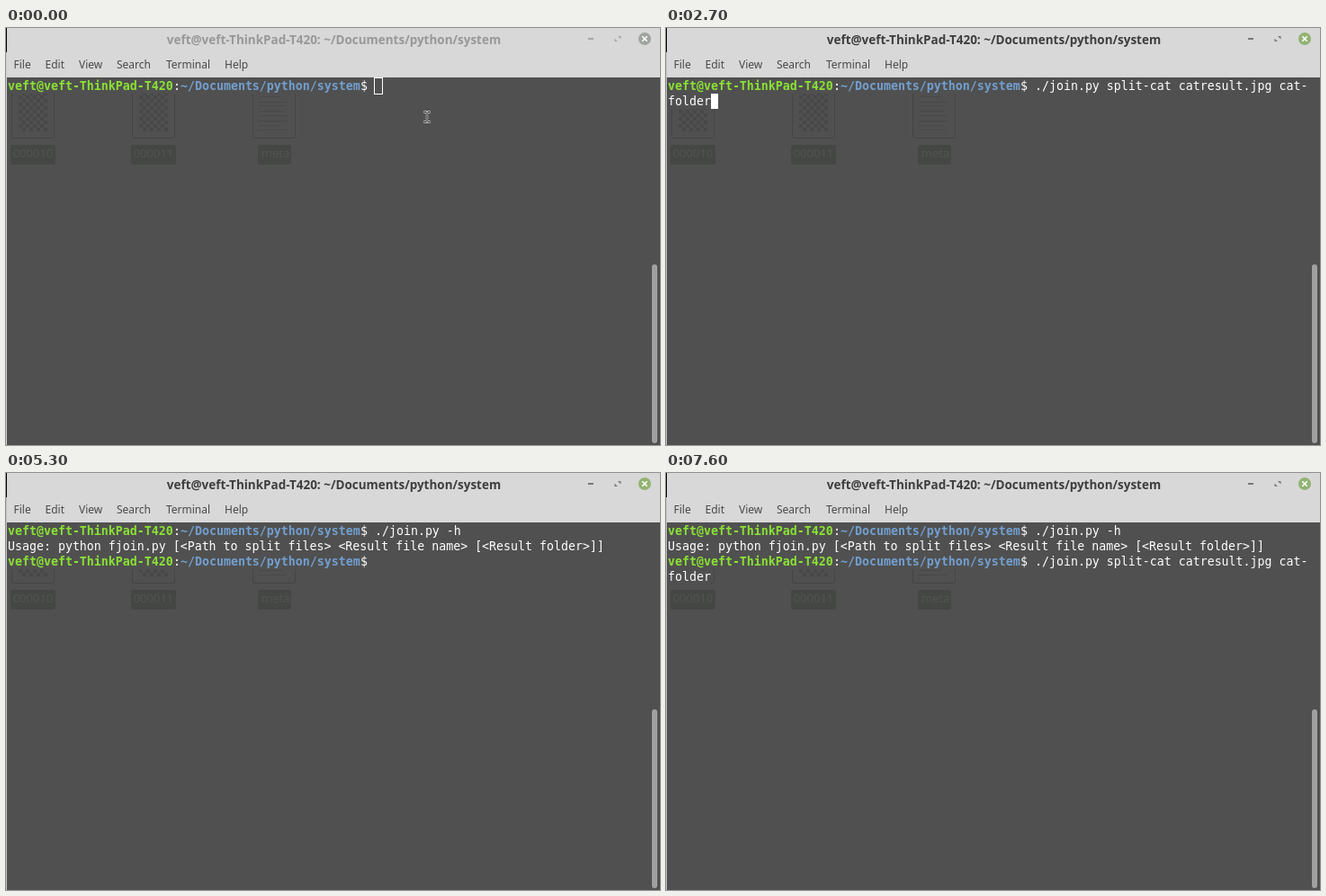
These frames come from a looping animation (727 by 464 pixels, 8000 ms). An HTML page:

```html
<!DOCTYPE html>
<html lang="en">
<head>
<meta charset="utf-8">
<title>Terminal session</title>
<style>
  html, body { margin: 0; width: 100%; height: 100%; overflow: hidden; background: #505050; }
  svg { display: block; }
  text { white-space: pre; }
  .mono { font-family: "DejaVu Sans Mono", monospace; font-size: 13.288px; }
  .sans { font-family: "Noto Sans", sans-serif; font-size: 12px; }
  .title { font-size: 13.47px; font-weight: bold; }
  .label { font-size: 13px; fill: #525452; }
</style>
</head>
<body>
<svg id="stage" width="727" height="464" viewBox="0 0 727 464">
  <defs>
    <pattern id="checker" x="14" y="75" width="8" height="8" patternUnits="userSpaceOnUse">
      <path d="M0 0h4v4h-4zM4 4h4v4h-4z" fill="#484848"/>
    </pattern>
    <g id="image-icon">
      <path d="M6.500 55V120.500q0 2 2 2H51.500q2 0 2-2V55" fill="none" stroke="#444"/>
      <path d="M14 55h32v60h-32z" fill="url(#checker)"/>
    </g>
  </defs>
  <rect width="727" height="464" fill="#505050"/>

  <!-- desktop showing through the terminal -->
  <use href="#image-icon"/>
  <use href="#image-icon" x="134"/>
  <path d="M274.500 55V120.500q0 2 2 2H319.500q2 0 2-2V55" fill="none" stroke="#444"/>
  <path d="M281 76.500h25M281 82.500h32M281 86.500h30M281 92.500h28M281 97.500h32M281 103.500h33M281 108.500h26M281 113.500h31" stroke="#484848"/>
  <g fill="#454745">
    <rect x="5" y="130" width="50" height="22" rx="2"/>
    <rect x="139" y="130" width="50" height="22" rx="2"/>
    <rect x="280" y="130" width="37" height="22" rx="2"/>
  </g>
  <g class="sans label" text-anchor="middle">
    <text x="30" y="144">000010</text>
    <text x="164" y="144">000011</text>
    <text x="299.500" y="144">meta</text>
  </g>

  <g id="screen"></g>

  <!-- window frame -->
  <rect width="727" height="55" fill="#d8d8d8"/>
  <rect id="edge" y="27" width="1" height="437"/>
  <rect width="1" height="27" fill="#000"/>
  <rect x="718" y="263" width="6" height="199" rx="3" fill="#a0a0a0"/>
  <text id="title" class="sans title" x="364.500" y="18" text-anchor="middle"></text>
  <g id="buttons">
    <path d="M647 11h6v2h-6z"/>
    <path d="M680 9h3.500v3.500zM676.500 11.500v3.500h3.500z"/>
  </g>
  <circle id="close" cx="710" cy="12" r="7"/>
  <path d="M707.300 9.300l5.400 5.400M712.700 9.300l-5.400 5.400" stroke="#fff" stroke-width="1.600"/>
  <g class="sans" fill="#484848">
    <text x="8.500" y="45">File</text>
    <text x="43.500" y="45">Edit</text>
    <text x="81" y="45">View</text>
    <text x="123" y="45">Search</text>
    <text x="178" y="45">Terminal</text>
    <text x="243" y="45">Help</text>
  </g>
  <g id="pointer" fill="none">
    <path d="M464.500 93.500h2.500l1 1 1-1h2.500M468 94.500v9M464.500 104.500h2.500l1-1 1 1h2.500" stroke="#e8e8e8" stroke-width="2.400"/>
    <path d="M465 93.500h2l1 1 1-1h2M468 94.500v9M465 104.500h2l1-1 1 1h2" stroke="#000"/>
  </g>
</svg>
<script>
const LOOP = 8000, COLS = 89, CELL = 8, ROW = 17, LEFT = 2, TOP = 56;
const HOST = "veft@veft-ThinkPad-T420", DIR = "~/Documents/python/system";
const PROMPT = `${HOST}:${DIR}$ `;
const HELP = PROMPT + "./join.py -h";
const CLEAR = PROMPT + "clear";
const JOIN = PROMPT + "./join.py split-cat catresult.jpg cat-folder";
const USAGE = "Usage: python fjoin.py [<Path to split files> <Result file name> [<Result folder>]]";
const done = [HELP, USAGE];

// [start time, terminal lines, cursor]
const steps = [
  [0, [PROMPT], "hollow"],
  [200, [PROMPT], "solid"],
  [900, [PROMPT]],
  [1500, [PROMPT], "solid"],
  [2100, [PROMPT]],
  [2500, [CLEAR], "solid"],
  [2700, [JOIN], "solid"],
  [3000, [HELP], "solid"],
  [3400, [HELP, ""], "solid"],
  [3800, [...done, PROMPT], "solid"],
  [4100, [...done, PROMPT]],
  [4700, [...done, PROMPT], "solid"],
  [5300, [...done, PROMPT]],
  [5900, [...done, PROMPT], "solid"],
  [6400, [...done, HELP]],
  [6500, [...done, HELP], "solid"],
  [6700, [...done, CLEAR], "solid"],
  [7000, [...done, JOIN], "solid"],
  [7600, [...done, JOIN]]
];

const $ = id => document.getElementById(id);
const screen = $("screen");
$("title").textContent = `${HOST}: ${DIR}`;

function add(tag, attrs, text = "") {
  const node = document.createElementNS("http://www.w3.org/2000/svg", tag);
  for (const name in attrs) node.setAttribute(name, attrs[name]);
  node.textContent = text;
  screen.append(node);
}

function write(col, row, text, fill = "#fff", weight = "normal") {
  add("text", { class: "mono", x: LEFT + col * CELL, y: TOP + row * ROW + 13, fill, "font-weight": weight }, text);
}

function drawRow(text, row) {
  add("rect", { x: LEFT, y: TOP + row * ROW, width: text.length * CELL, height: ROW, fill: "#505050" });
  if (!text.startsWith(PROMPT)) return write(0, row, text);
  const dirCol = HOST.length + 1, endCol = dirCol + DIR.length;
  write(0, row, HOST, "#8ae234", "bold");
  write(HOST.length, row, ":");
  write(dirCol, row, DIR, "#729fcf", "bold");
  write(endCol, row, text.slice(endCol));
}

function drawScreen([, lines, cursor]) {
  screen.replaceChildren();
  const rows = lines.flatMap(line =>
    line.length > COLS ? [line.slice(0, COLS), line.slice(COLS)] : [line]);
  rows.forEach(drawRow);
  const x = LEFT + rows.at(-1).length * CELL, y = TOP + (rows.length - 1) * ROW;
  if (cursor === "solid") add("rect", { x, y, width: CELL, height: ROW, fill: "#fff" });
  if (cursor === "hollow")
    add("rect", { x: x - 0.5, y: y - 0.5, width: CELL + 1, height: ROW + 1, fill: "none", stroke: "#fff" });
}

function mix(from, to, k) {
  return `rgb(${from.map((v, i) => Math.round(v + (to[i] - v) * k))})`;
}

function setFocus(k) {
  $("title").setAttribute("fill", mix([152, 152, 152], [62, 62, 62], k));
  $("buttons").setAttribute("fill", mix([165, 165, 172], [120, 120, 120], k));
  $("close").setAttribute("fill", mix([160, 164, 160], [146, 179, 114], k));
  $("edge").setAttribute("fill", mix([207, 207, 207], [192, 192, 192], k));
}

let shown;
function frame() {
  const t = performance.now() % LOOP;
  const step = steps.findLast(s => s[0] <= t);
  if (step !== shown) drawScreen(shown = step);
  setFocus(t < 200 ? 0 : t < 300 ? 0.5 : 1);
  $("pointer").style.display = t < 2400 ? "" : "none";
  requestAnimationFrame(frame);
}
frame();
</script>
</body>
</html>
```
